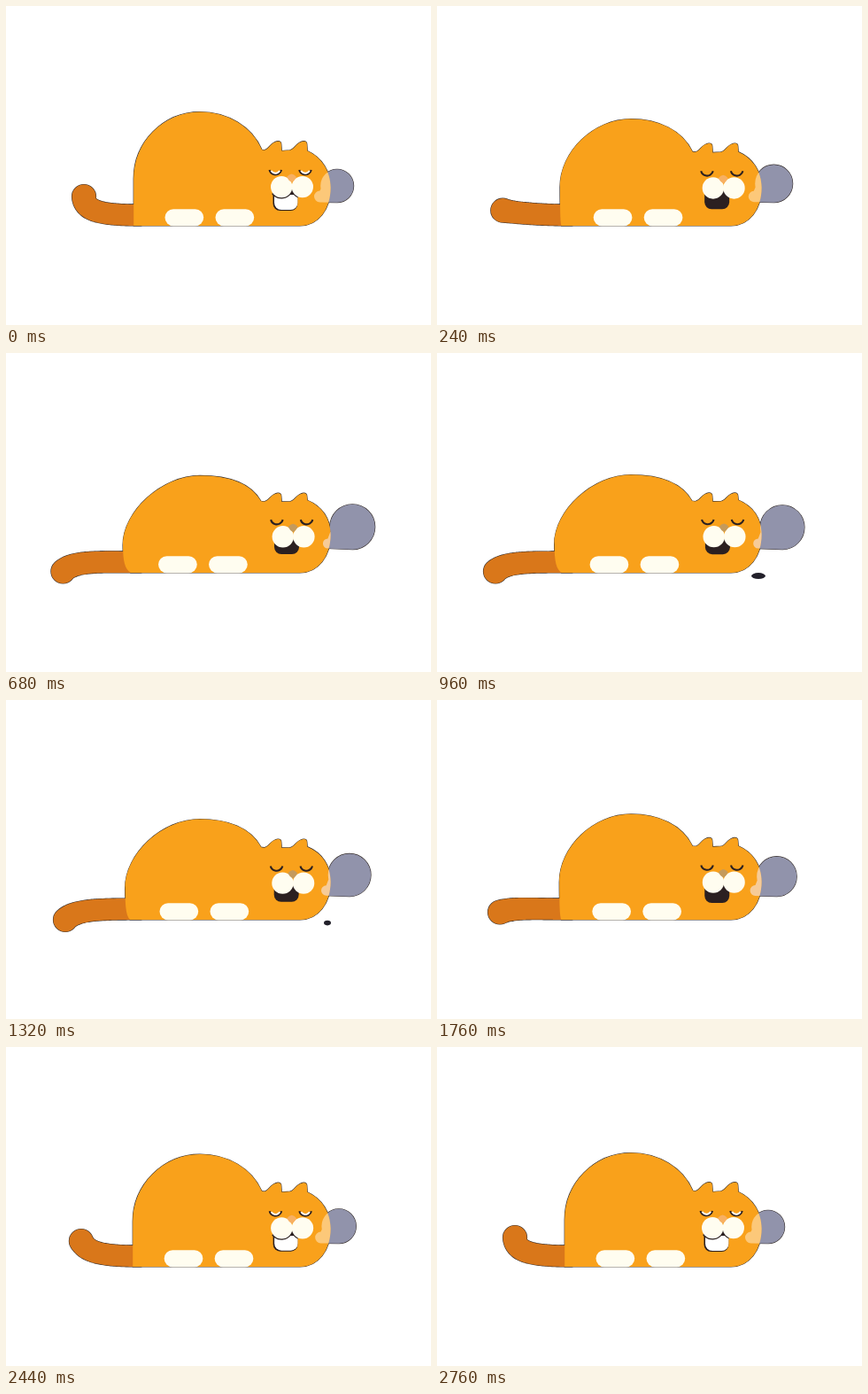
Write an HTML page with a canvas that moves like this. It is 480x360 px and loops after 2.8 s.

```html
<!DOCTYPE html>
<html lang="en">
<head>
<meta charset="utf-8">
<title>Sleeping cat</title>
<style>
  html, body { margin: 0; width: 100%; height: 100%; overflow: hidden; background: #fff; }
  canvas { display: block; width: 480px; height: 360px; }
</style>
</head>
<body>
<canvas id="stage" width="480" height="360"></canvas>
<script>
const LOOP = 2800;
const TAU = Math.PI * 2;
const ctx = document.getElementById('stage').getContext('2d');

const times = [0, 440, 720, 960, 1320, 1760, 2120, 2760, 2800];
const tracks = {
  breath: [0, .84, 1, .95, .79, .49, .24, 0, 0],
  bubble: [0, .77, 1, .92, .8, .56, .32, 0, 0],
  tipX: [88, 64, 64.5, 66, 67, 71, 79, 88, 88],
  tipY: [215, 244, 246.5, 246.5, 248, 239.5, 227, 215, 215],
  bendX: [88, 76, 76, 77, 78, 86, 95, 88, 88],
  bendY: [232, 233, 234, 235, 236, 234, 232, 232, 232]
};
const puddleTimes = [0, 800, 960, 1320, 1560, 2800];
const puddleSize = [0, 0, 1, .5, 0, 0];

// Monotone cubic interpolation: no overshoot, flat at the extremes.
function sample(ts, vs, t) {
  let i = 0;
  while (i < ts.length - 2 && t >= ts[i + 1]) i++;
  const slope = j => (vs[j + 1] - vs[j]) / (ts[j + 1] - ts[j]);
  const tangent = j => {
    if (j === 0 || j === ts.length - 1) return 0;
    const a = slope(j - 1), b = slope(j);
    return a * b > 0 ? 2 * a * b / (a + b) : 0;
  };
  const h = ts[i + 1] - ts[i], u = (t - ts[i]) / h, w = 1 - u;
  return vs[i] * (1 + 2 * u) * w * w + vs[i + 1] * u * u * (3 - 2 * u)
    + h * u * w * (tangent(i) * w - tangent(i + 1) * u);
}

function bodyPath(b) {
  const p = new Path2D();
  const left = 144.2 - 12.2 * b, top = 119.5 + 19 * b, side = 195 + 22 * b;
  const inset = 9 * b * b, d = 5.5 * b, round = .55 - .06 * b;
  p.moveTo(left + inset, 248);
  p.bezierCurveTo(left + inset / 4, 244, left, 235, left, side);
  p.bezierCurveTo(left, side - round * (side - top), 219 - round * (219 - left), top, 219, top);
  p.bezierCurveTo(250, top, 278 - 2 * b, 136 + 10 * b, 289 - b, 162.3 + d * .9);
  for (const x of [0, 29]) {
    p.lineTo(291.5 + x, 162.8 + d * .9);
    p.bezierCurveTo(297 + x, 162 + d, 299 + x, 153.5 + d, 307 + x, 152.7 + d);
    p.quadraticCurveTo(310.8 + x, 152.5 + d, 310.8 + x, 156 + d);
    p.lineTo(311.3 + x, 163.5 + d * (x ? .5 : .8));
  }
  p.bezierCurveTo(357, 171 + 2 * b, 366.6, 187, 366.6, 205);
  p.bezierCurveTo(366.6, 229, 353, 248, 332, 248);
  p.closePath();
  return p;
}

function tailPath(bendX, bendY, tipX, tipY) {
  const p = new Path2D(), n = 56;
  const curve = (u, a, b, c, d) => {
    const w = 1 - u;
    return a * w * w * w + 3 * b * w * w * u + 3 * c * w * u * u + d * u * u * u;
  };
  for (let i = 0; i <= n; i++) {
    const u = i / n, r = 12 + 1.5 * u * u * u;
    const x = curve(u, 150, 109, bendX, tipX), y = curve(u, 236, 236, bendY, tipY);
    p.moveTo(x + r, y);
    p.arc(x, y, r, 0, TAU);
  }
  return p;
}

function bubblePath(q) {
  const p = new Path2D();
  const r = 18.7 + 6.8 * q, x = 392.6 + 24.3 * q - r, y = 221.7 - r;
  const neck = 354.5 + 9 * q, nr = 6.5 - q;
  p.arc(x, y, r, 0, TAU);
  p.moveTo(neck + nr, 215);
  p.arc(neck, 215, nr, 0, TAU);
  p.moveTo(neck, 215 - nr);
  p.lineTo(x - r * .9, y);
  p.lineTo(x, y);
  p.lineTo(x, 221.7);
  p.lineTo(neck, 215 + nr);
  p.closePath();
  return p;
}

function fill(path, color) {
  ctx.fillStyle = color;
  ctx.fill(path);
}

function disc(x, y, rx, ry, color) {
  ctx.fillStyle = color;
  ctx.beginPath();
  ctx.ellipse(x, y, rx, ry, 0, 0, TAU);
  ctx.fill();
}

function pill(x, y, w, h, r, color) {
  ctx.fillStyle = color;
  ctx.beginPath();
  ctx.roundRect(x, y, w, h, r);
  ctx.fill();
}

function arc(x, y, r, from, to, width, color) {
  ctx.strokeStyle = color;
  ctx.lineWidth = width;
  ctx.beginPath();
  ctx.arc(x, y, r, from * Math.PI, to * Math.PI);
  ctx.stroke();
}

function drawFace(b, pale, noseColor) {
  const dark = '#2b2021', cream = '#fffdf0';
  const dx = 1.6 * b, dy = 3.2 * b;

  for (const x of [304.3, 338]) {
    arc(x + dx, 183.2 + dy, 7, .08, .92, 2.1, dark);
    if (pale) arc(x + dx, 183.5 + dy, 5.3, .15, .85, 2, '#fff');
  }

  const mx = 301.5 + 1.5 * b, bottom = 231 - 4 * b;
  const corners = [0, 0, 8, 8];
  pill(mx, 207 + dy, 28, bottom - 207 - dy, corners, dark);
  if (pale) {
    pill(mx + 1.5, 213, 26.5, bottom - 214, corners, '#fff');
    for (const x of [311, 335]) arc(x + dx, 204 + dy, 12.5, .2, .8, 2, dark);
    fill(new Path2D('M329.7 210h18v16h-18z'), '#f9a11b');
  }

  for (const x of [311.2, 334.8]) disc(x + dx, 204.1 + dy, 12.2, 12.2, cream);

  ctx.fillStyle = noseColor;
  ctx.beginPath();
  ctx.moveTo(317 + dx, 193 + dy);
  ctx.quadraticCurveTo(322.7 + dx, 186 + dy, 328 + dx, 193 + dy);
  ctx.quadraticCurveTo(326 + dx, 197 + dy, 322.7 + dx, 199 + dy);
  ctx.quadraticCurveTo(319 + dx, 197 + dy, 317 + dx, 193 + dy);
  ctx.fill();
}

function draw(t) {
  const s = {};
  for (const key in tracks) s[key] = sample(times, tracks[key], t);
  const b = s.breath;
  const pale = t < 120 || t >= 2320;
  const muted = t >= 580 && t < 2000;
  const body = bodyPath(b);
  const tail = tailPath(s.bendX, s.bendY, s.tipX, s.tipY);
  const bubble = bubblePath(s.bubble);

  ctx.fillStyle = '#fff';
  ctx.fillRect(0, 0, 480, 360);

  // Only the outer half of each outline survives the fills.
  ctx.lineWidth = 1.2;
  ctx.strokeStyle = '#3a3230';
  for (const shape of [tail, body, bubble]) ctx.stroke(shape);
  fill(bubble, '#9193ab');
  fill(tail, '#d9771a');
  fill(body, '#f9a11b');

  for (const x of [179.5, 236.5]) pill(x - 7.5 * s.bubble, 229.3, 43.7, 19, 9.5, '#fffdf0');
  drawFace(b, pale, muted ? '#c49a5c' : '#f7b063');

  ctx.save();
  ctx.clip(body);
  fill(bubble, muted ? 'rgba(245,232,235,.6)' : 'rgba(255,245,235,.45)');
  ctx.restore();

  const puddle = sample(puddleTimes, puddleSize, t);
  if (puddle > .02) {
    disc(363, 251.6, 8 * puddle, 3.5 * Math.min(1, puddle * 1.6), '#23212b');
  }
}

function frame(now) {
  draw(now % LOOP);
  requestAnimationFrame(frame);
}
draw(0);
requestAnimationFrame(frame);
</script>
</body>
</html>
```
